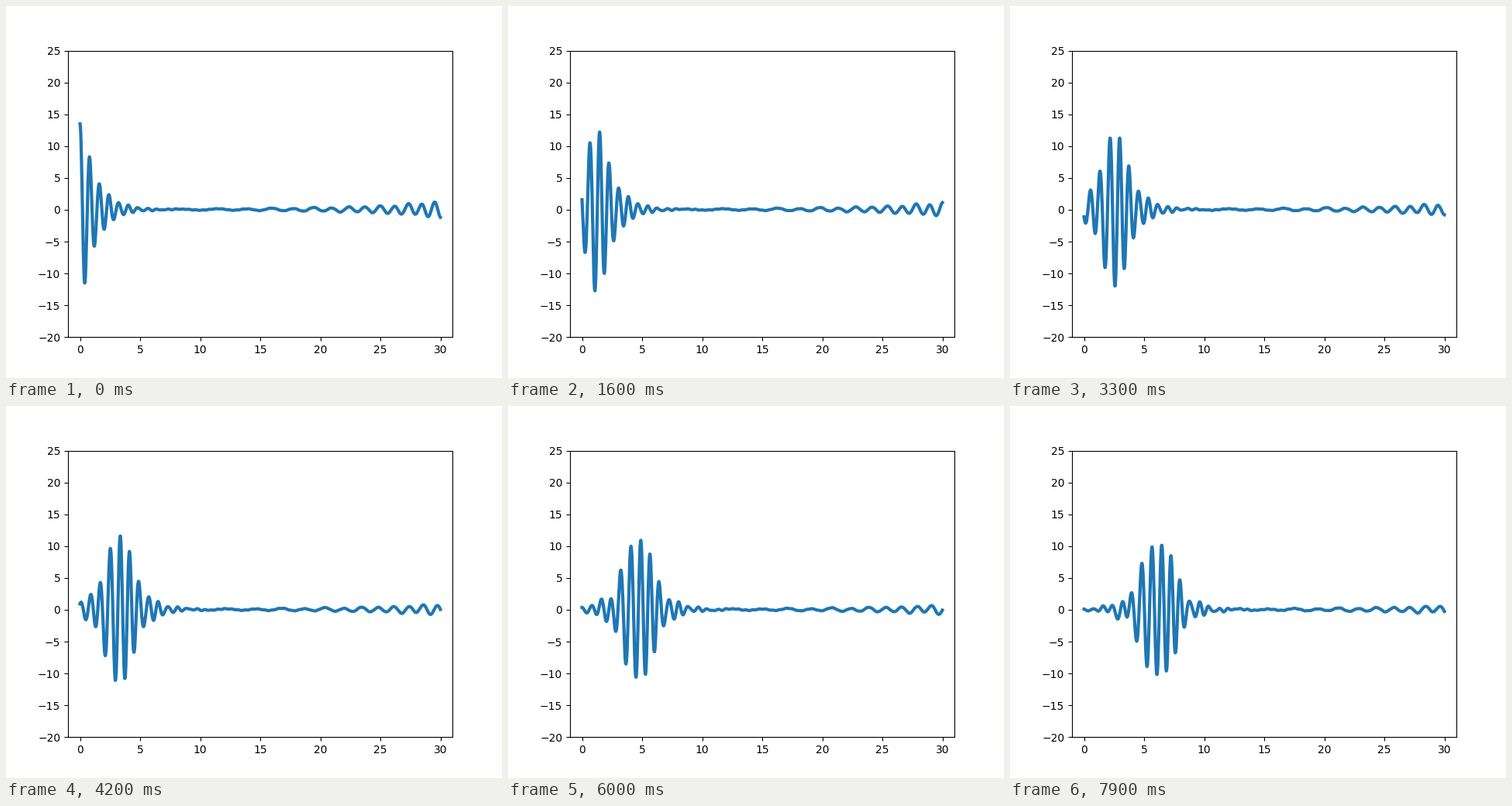
Recreate the animation shown at these times as a matplotlib script. Size 640x480 px, loop 8 s.

```python
import numpy as np
import matplotlib.pyplot as plt
from matplotlib.animation import FuncAnimation

FRAMES = 80
INTERVAL = 100  # ms
DT = 0.01       # model time per frame

# Evenly spaced frequencies with a Lorentzian weight around 5
step = 10 / 49
freq = step * np.arange(1, 51)
weight = 1 / (1 + (freq - 5) ** 2)
omega = 2 * np.pi * freq

# Quadratic dispersion, omega = k^2 / 2 + one frequency step
k = np.sqrt(2 * np.maximum(omega - 2 * np.pi * step, 0))

x = np.linspace(0, 30, 1000)
modes = weight[:, None] * np.exp(1j * np.outer(k, x))


def wave(t):
    return (np.exp(-1j * omega * t) @ modes).real


fig, ax = plt.subplots(figsize=(6.4, 4.8), dpi=100)
ax.set_xlim(-1, 31)
ax.set_ylim(-20, 25)
line, = ax.plot(x, wave(0), color="#1f77b4", lw=3)


def update(i):
    line.set_ydata(wave(i * DT))
    return line,


anim = FuncAnimation(fig, update, frames=FRAMES, interval=INTERVAL,
                     repeat=True, repeat_delay=0)
plt.show()
```
